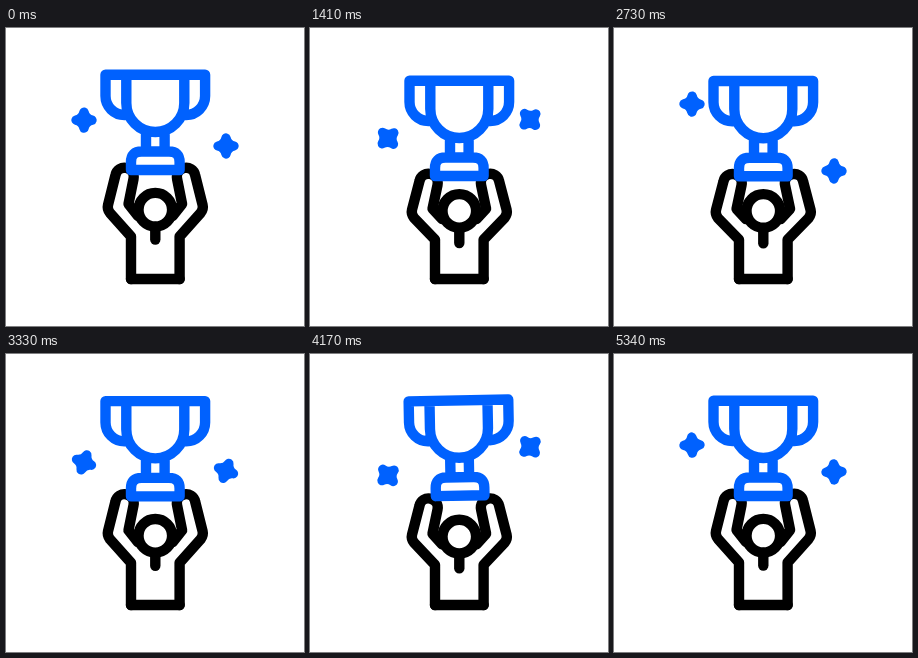
An HTML page for the animation above (5400 ms loop, 298 by 298 pixels).

```html
<!DOCTYPE html>
<html lang="en">
<head>
<meta charset="utf-8">
<title>Trophy toss</title>
<style>
  html, body { margin: 0; width: 100%; height: 100%; overflow: hidden; background: #fff; }
  svg { display: block; width: 100vw; height: 100vh; }
  svg * { stroke-linecap: round; stroke-linejoin: round; }
</style>
</head>
<body>
<svg viewBox="0 0 298 298" fill="none" stroke="#000" stroke-width="10.4">
  <path d="M125 251H173.600"/>
  <path id="left"/>
  <path id="right" transform="translate(298.6 0) scale(-1 1)"/>
  <circle id="head" cx="149.3" cy="181.7" r="16.8"/>
  <path id="neck" d="M149.300 199V211.500"/>
  <g stroke="#0061fe">
    <path id="rays"/>
    <path id="trophy" d="M99.500 46.700H199.100V68A19 19 0 0 1 180 87M99.500 46.700V68A19 19 0 0 0 118.600 87
      M120.300 47V75A29 29 0 0 0 178.300 75V47M140 104V122M158.600 104V122
      M125 142V134Q125 123.500 135.500 123.500H163Q173.600 123.500 173.600 134V142Z"/>
    <g fill="#0061fe" stroke-width="9.4">
      <path id="starA" d="M0-8Q1.500-1.500 8 0Q1.500 1.500 0 8Q-1.500 1.500-8 0Q-1.500-1.500 0-8Z"/>
      <path id="starB" d="M0-8Q1.500-1.500 8 0Q1.500 1.500 0 8Q-1.500 1.500-8 0Q-1.500-1.500 0-8Z"/>
    </g>
  </g>
</svg>
<script>
const LOOP = 5400;
const { PI, sin, cos } = Math;
const set = (id, name, value) => document.getElementById(id).setAttribute(name, value);
const clamp = x => Math.min(1, Math.max(0, x));
const ease = x => (1 - cos(PI * clamp(x))) / 2;
const pulse = (t, start, length) => sin(PI * clamp((t - start) / length)) ** 2;

// Two quick bobs, a wind-up before the throw, and a catch
const crouch = t => 6.3 * (pulse(t, 0, 900) + pulse(t, 900, 900) + pulse(t, 1950, 1500) + pulse(t, 3600, 1750));

function drawPerson(dip) {
  const elbow = dip * 0.8, shoulder = dip * 0.5;
  const arm = `M125 251V${208.5 + shoulder}L104 ${185 + elbow}Q101 ${181 + elbow} 102 ${177 + elbow}
    L109.500 ${147 + dip}A9.200 9.200 0 0 1 127.500 ${151 + dip}L122.500 ${176 + elbow}L132 ${188 + shoulder}`;
  set("left", "d", arm);
  set("right", "d", arm);
  set("head", "transform", `translate(0 ${dip * 0.2})`);
  set("neck", "transform", `translate(0 ${dip * 0.6})`);
}

function drawTrophy(t, dip) {
  const p = clamp((t - 3400) / 800);
  const lift = 139 * p * (1 - p);
  const tilt = -12 * sin(PI * p ** 0.75);
  set("trophy", "transform", `translate(0 ${dip - lift}) rotate(${tilt} 149.3 94)`);
}

// A ray grows outwards, then its near end catches up
function ray(x, y, X, Y, age) {
  const near = ease((age - 300) / 270), far = ease(age / 270);
  if (age < 0 || near === 1) return "";
  const at = k => `${x + (X - x) * k} ${y + (Y - y) * k}`;
  return `M${at(near)}L${at(far)}`;
}

function drawRays(t) {
  const age = t < 1400 ? t - 560 : t - 1460;
  set("rays", "d", ray(126, 31, 113.5, 15.5, age)
    + ray(149.3, 22, 149.3, 8, age - 45)
    + ray(172.6, 31, 185.5, 15.5, age));
}

// Both stars drift on sums of slow waves and make half a turn per loop
function drawStars(t) {
  const a = 2 * PI * t / LOOP, lag = 0.59;
  const yA = 101 + 10.3 * cos(a + lag) - 21 * cos(2 * a + lag);
  const yB = 111 - 8.4 * cos(a) + 19.5 * cos(2 * a) - 4.1 * cos(3 * a);
  const turn = 180 * t / LOOP;
  set("starA", "transform", `translate(78 ${yA}) rotate(${turn})`);
  set("starB", "transform", `translate(220 ${yB}) rotate(${turn})`);
}

const begin = performance.now();
function tick() {
  const t = (performance.now() - begin) % LOOP;
  const dip = crouch(t);
  drawPerson(dip);
  drawTrophy(t, dip);
  drawRays(t);
  drawStars(t);
  requestAnimationFrame(tick);
}
tick();
</script>
</body>
</html>
```
